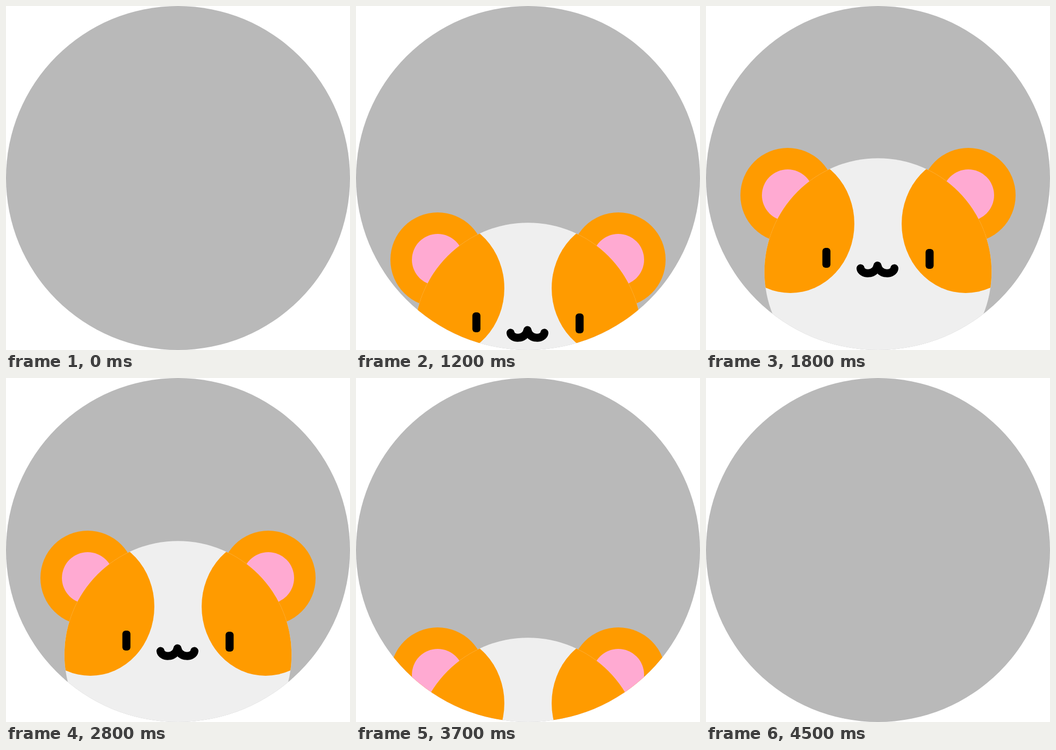
An HTML page that plays this animation: 640x640 px, repeating every 4.6 s.

```html
<!DOCTYPE html>
<html lang="en">
<head>
<meta charset="utf-8">
<title>Peeking hamster</title>
<style>
  html, body { margin: 0; width: 100%; height: 100%; overflow: hidden; background: #fff; }
  svg { display: block; width: 100vw; height: 100vh; }
</style>
</head>
<body>
<svg viewBox="0 0 640 640">
  <defs>
    <clipPath id="window"><circle cx="320" cy="320" r="320"/></clipPath>
    <clipPath id="headShape"><circle cx="320" cy="494.5" r="211.3"/></clipPath>
    <g id="ear">
      <circle cx="152" cy="352" r="88" fill="#ff9b00"/>
      <circle cx="152" cy="352" r="48" fill="#ffaad2"/>
    </g>
    <ellipse id="patch" cx="157" cy="405" rx="119" ry="129" fill="#ff9b00"/>
    <rect id="eye" x="216.5" y="450" width="15" height="37" rx="6"/>
  </defs>
  <circle cx="320" cy="320" r="320" fill="#b9b9b9"/>
  <g clip-path="url(#window)">
    <g id="hamster" transform="translate(0 360)">
      <use href="#ear"/>
      <use href="#ear" transform="translate(640) scale(-1 1)"/>
      <circle cx="320" cy="494.5" r="211.3" fill="#efefef"/>
      <g clip-path="url(#headShape)">
        <use href="#patch"/>
        <use href="#patch" transform="translate(640) scale(-1 1)"/>
      </g>
      <use href="#eye"/>
      <use href="#eye" x="192" y="2"/>
      <path d="M287.5 488C289 500 315 502 319 483C323 502 349 500 350.5 488"
        fill="none" stroke="#000" stroke-width="15" stroke-linecap="round" stroke-linejoin="round"/>
    </g>
  </g>
</svg>
<script>
  const LOOP = 4600, STEP_MS = 100, STEP_PX = 20;
  const RISEN = 18, SINKING = 27; // steps when the rise ends and the descent begins
  const hamster = document.getElementById('hamster');
  const start = performance.now();

  function draw() {
    const time = (performance.now() - start) % LOOP;
    const step = Math.floor(time / STEP_MS);
    const drop = STEP_PX * Math.max(0, RISEN - step, step - SINKING);
    hamster.setAttribute('transform', `translate(0 ${drop})`);
    requestAnimationFrame(draw);
  }
  draw();
</script>
</body>
</html>
```
